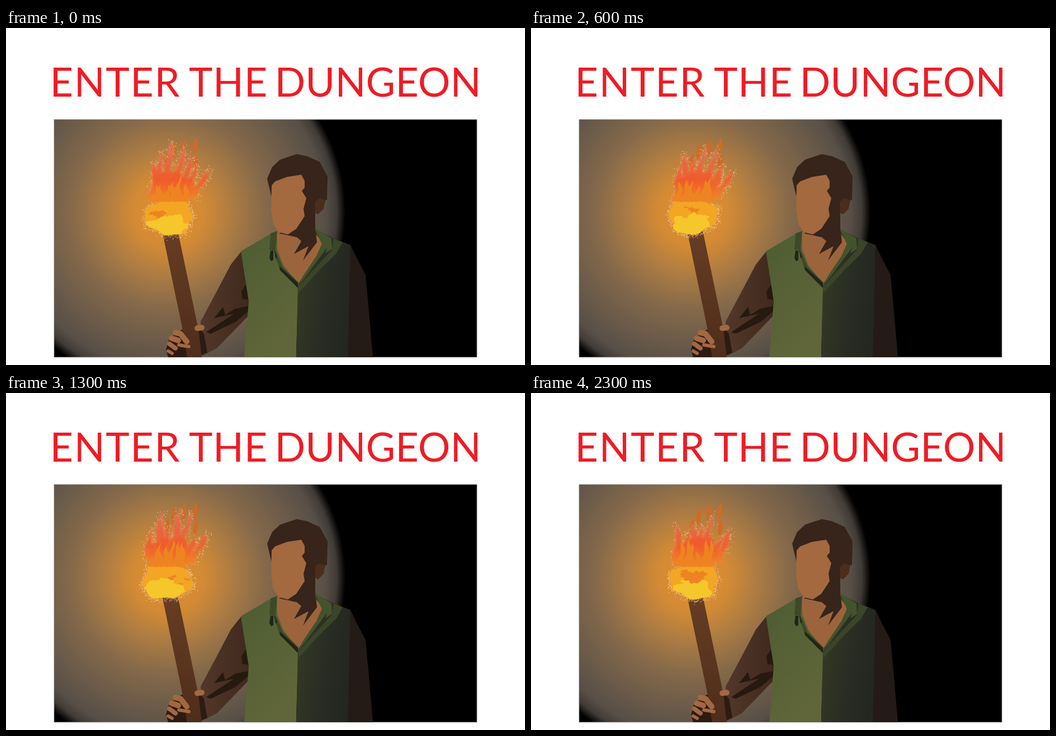
These frames come from a looping animation (928x604 px, 2400 ms). An HTML page with a canvas:

```html
<!DOCTYPE html>
<html lang="en">
<head>
<meta charset="utf-8">
<title>Enter the Dungeon</title>
<style>
html, body { margin: 0; width: 100%; height: 100%; overflow: hidden; background: #fff; }
svg, canvas { position: absolute; left: 0; top: 0; }
text { font: 72px Lato, sans-serif; fill: #ee1c25; }
</style>
</head>
<body>
<svg width="928" height="604" viewBox="0 0 928 604">
  <defs>
    <radialGradient id="glow" gradientUnits="userSpaceOnUse" cx="290" cy="330" r="317">
      <stop offset="0" stop-color="#e2902c"/>
      <stop offset=".2" stop-color="#d38a34"/>
      <stop offset=".36" stop-color="#ad7c43"/>
      <stop offset=".55" stop-color="#85694a"/>
      <stop offset=".78" stop-color="#665849"/>
      <stop offset=".89" stop-color="#574f47"/>
      <stop offset=".95" stop-color="#403b36"/>
      <stop offset="1" stop-color="#000"/>
    </radialGradient>
    <linearGradient id="vest" x1="0" y1="0" x2=".5" y2="1">
      <stop offset="0" stop-color="#4d5c32"/>
      <stop offset="1" stop-color="#606639"/>
    </linearGradient>
    <linearGradient id="shade" x1="0" y1=".2" x2="1" y2=".5">
      <stop offset="0" stop-color="#353a25"/>
      <stop offset=".6" stop-color="#292c23"/>
      <stop offset="1" stop-color="#24271f"/>
    </linearGradient>
    <linearGradient id="sleeve" x2="1">
      <stop offset="0" stop-color="#53372a"/>
      <stop offset="1" stop-color="#3f291d"/>
    </linearGradient>
    <linearGradient id="wood" x2="0" y2="1">
      <stop offset="0" stop-color="#673d23"/>
      <stop offset="1" stop-color="#4e2d1b"/>
    </linearGradient>
    <path id="lick" d="M0-16Q6 0-4 15-11 0 0-16Z"/>
  </defs>

  <text y="122.5"><tspan x="78.5" letter-spacing="1.6">ENTER</tspan><tspan x="327" letter-spacing=".6">THE</tspan><tspan x="480.5" letter-spacing=".1">DUNGEON</tspan></text>
  <path fill="url(#glow)" stroke="#888" stroke-width=".8" d="M86 164H842V590H86Z"/>

  <!-- sleeves -->
  <path fill="url(#sleeve)" d="M421 400L402 424 371 483 348 526 350 588 377 574 435 514 434 480Z"/>
  <path fill="#261910" d="M430 458L421 472 423 486 434 487ZM388 500L372 520 408 512 358 545 366 548 410 527 434 507V498L410 503 392 514Z"/>
  <path fill="#241b16" d="M616 389L625 408 643 443 650 520 656 590H610Z"/>

  <!-- vest -->
  <path fill="url(#vest)" d="M420 400L473 369 490 364 522 463 519 590H426L434 490Z"/>
  <path fill="url(#shade)" d="M522 463L556 362 583 376 616 389 611 590H519Z"/>
  <path fill="#3a4529" d="M522 464L583 397 585 377 602 384 590 405 560 434 523 475Z"/>

  <!-- neck and chest -->
  <path fill="#9c643d" d="M484 366L540 350 566 385 552 416 522 459 496 425 485 397Z"/>
  <path fill="#37241a" d="M488 368L520 375 528 382 515 405 541 391 531 417 556 384 552 348 524 352Z"/>

  <!-- collar -->
  <path fill="#3c4a28" d="M473 368L485 364 482 398 495 428 523 456 521 465 490 434 478 398 471 398Z"/>
  <path fill="#43532d" d="M552 359L582 377 583 396 571 404 574 394 523 462 530 446 558 404 565 388Z"/>
  <path fill="#20251a" d="M473 399H478V416L474 418 471 412ZM480 398L485 411 482 413ZM489 427L522 457 522 466 490 434Z"/>

  <!-- head -->
  <path fill="#37241a" d="M474 300L467 270 476 249 490 236 520 226 539 230 561 240 575 266 574 308 553 313 553 356 536 372 515 370Z"/>
  <path fill="#4b2d1d" d="M554 309L562 305 571 309 568 324 558 334 552 331Z"/>
  <path fill="#a4693f" d="M475 282L481 275 502 267 528 263 534 274 534 286 529 292 537 305 532 324 534 337 519 360 504 370 488 366 478 352 474 325Z"/>

  <!-- hand and torch -->
  <path fill="#2d1b12" d="M292 556L314 541 346 538 354 548 360 582 340 590H290L286 577Z"/>
  <path fill="url(#wood)" d="M279 363H307L344 540 350 590H324L314 532Z"/>
  <g fill="none" stroke="#a26841" stroke-width="10" stroke-linecap="round" stroke-linejoin="round">
    <path d="M303 546L312 548 323 562"/>
    <path d="M296 556L308 560"/>
    <path d="M309 568L327 571" stroke-width="6"/>
    <path d="M292 566L303 574" stroke-width="8"/>
    <path d="M290 579L297 583" stroke-width="6"/>
    <path d="M342 538L350 537"/>
  </g>

  <!-- steady licks behind the flame -->
  <g fill="#cf6b28">
    <use href="#lick" x="340" y="213"/>
    <use href="#lick" x="320" y="215"/>
    <use href="#lick" x="302" y="221"/>
    <use href="#lick" x="341" y="242"/>
    <use href="#lick" x="290" y="241"/>
  </g>
</svg>
<canvas id="fire" width="928" height="604"></canvas>
<script>
const ctx = document.getElementById('fire').getContext('2d');
const STEP = 100, STEPS = 24, TONGUES = 7;
const YELLOW = '#f5c72a', AMBER = '#f3a524', ORANGE = '#ee8421';

let seed = 1;
const rnd = () => (seed = seed * 16807 % 2147483647) / 2147483647;
const spread = n => (rnd() - rnd()) * n;

const heat = ctx.createLinearGradient(0, 200, 0, 312);
heat.addColorStop(0, '#e27a55');
heat.addColorStop(.35, '#ec6040');
heat.addColorStop(.65, '#f05a2c');
heat.addColorStop(1, '#f08a22');

function trace(point, n = 48) {
  ctx.beginPath();
  for (let i = 0; i < n; i++) ctx.lineTo(...point(i / n));
  ctx.closePath();
}

function fill(point, color) {
  trace(point);
  ctx.fillStyle = color;
  ctx.fill();
}

// Outlines map u in 0..1 to a point; a tongue runs down one side and up the other
function tongue(bx, by, tx, ty, w) {
  const phase = rnd() * 6;
  return u => {
    const s = 1 - Math.abs(2 * u - 1), side = u < .5 ? -1 : 1;
    const half = w * Math.pow(s, .8) * (1 + .25 * Math.sin(9 * s + phase));
    const sway = 14 * Math.sin(5 * s + phase) * (1 - s) * s;
    return [tx + (bx - tx) * s + sway + side * half, ty + (by - ty) * s];
  };
}

function blob(cx, cy, rx, ry, rough) {
  const phase = rnd() * 6;
  return u => {
    const a = u * Math.PI * 2;
    const r = 1 + rough * (Math.sin(3 * a + phase) + .8 * Math.sin(7 * a - phase));
    return [cx + rx * r * Math.cos(a), cy + ry * r * Math.sin(a)];
  };
}

function specks(point, count, size) {
  ctx.fillStyle = '#ffdcb0';
  for (let i = 0; i < count; i++) {
    const [x, y] = point(rnd());
    ctx.fillRect(x + spread(size), y + spread(size), 1.1, 1.1);
  }
}

function draw(step) {
  seed = 7919 * (step + 3);
  for (let i = 0; i < 5; i++) rnd();
  ctx.clearRect(0, 0, 928, 604);

  const cx = 291 + spread(5), cy = 335 + spread(4);
  const rx = 43 + spread(5), ry = 33;
  const head = blob(cx, cy, rx, ry, .07);
  const body = blob(cx + 7, 288, 36, 30, .1);

  // Tips fan out to the right, highest in the middle
  const flames = Array.from({ length: TONGUES }, (_, i) => {
    const k = i / (TONGUES - 1);
    const tipX = 262 + 98 * k + spread(10);
    const tipY = 252 - 38 * Math.sin(Math.PI * k) + spread(32);
    return tongue(cx - 27 + 62 * k, 306, tipX, tipY, 11);
  });

  for (const f of flames) specks(f, 110, 9);
  specks(head, 480, 9);

  ctx.filter = 'blur(3px)';
  ctx.globalAlpha = .6;
  for (const f of flames) fill(f, '#e98862');
  fill(head, '#eea04a');
  ctx.filter = 'blur(1.6px)';
  ctx.globalAlpha = .85;
  for (const f of [body, ...flames]) fill(f, heat);
  ctx.filter = 'none';
  ctx.globalAlpha = 1;

  fill(head, AMBER);
  // Orange licks rising out of the burning head
  for (let x = cx - 26; x < cx + 34; x += 10)
    fill(tongue(x, 312, x + 5 + spread(8), 284 - rnd() * 24, 8), ORANGE);

  ctx.save();
  trace(head);
  ctx.clip();
  fill(blob(cx - 4, cy + 20, rx * .85, ry * .65, .12), YELLOW);
  for (let i = 0; i < 9; i++) {
    const y = cy + spread(ry * .7);
    const color = y > cy ? YELLOW : i % 2 ? AMBER : ORANGE;
    fill(blob(cx + spread(rx * .9), y, 6 + rnd() * 9, 4 + rnd() * 6, .2), color);
  }
  ctx.restore();
}

let shown = -1;
function tick() {
  const step = Math.floor(performance.now() / STEP) % STEPS;
  if (step !== shown) draw(shown = step);
  requestAnimationFrame(tick);
}
tick();
</script>
</body>
</html>
```
